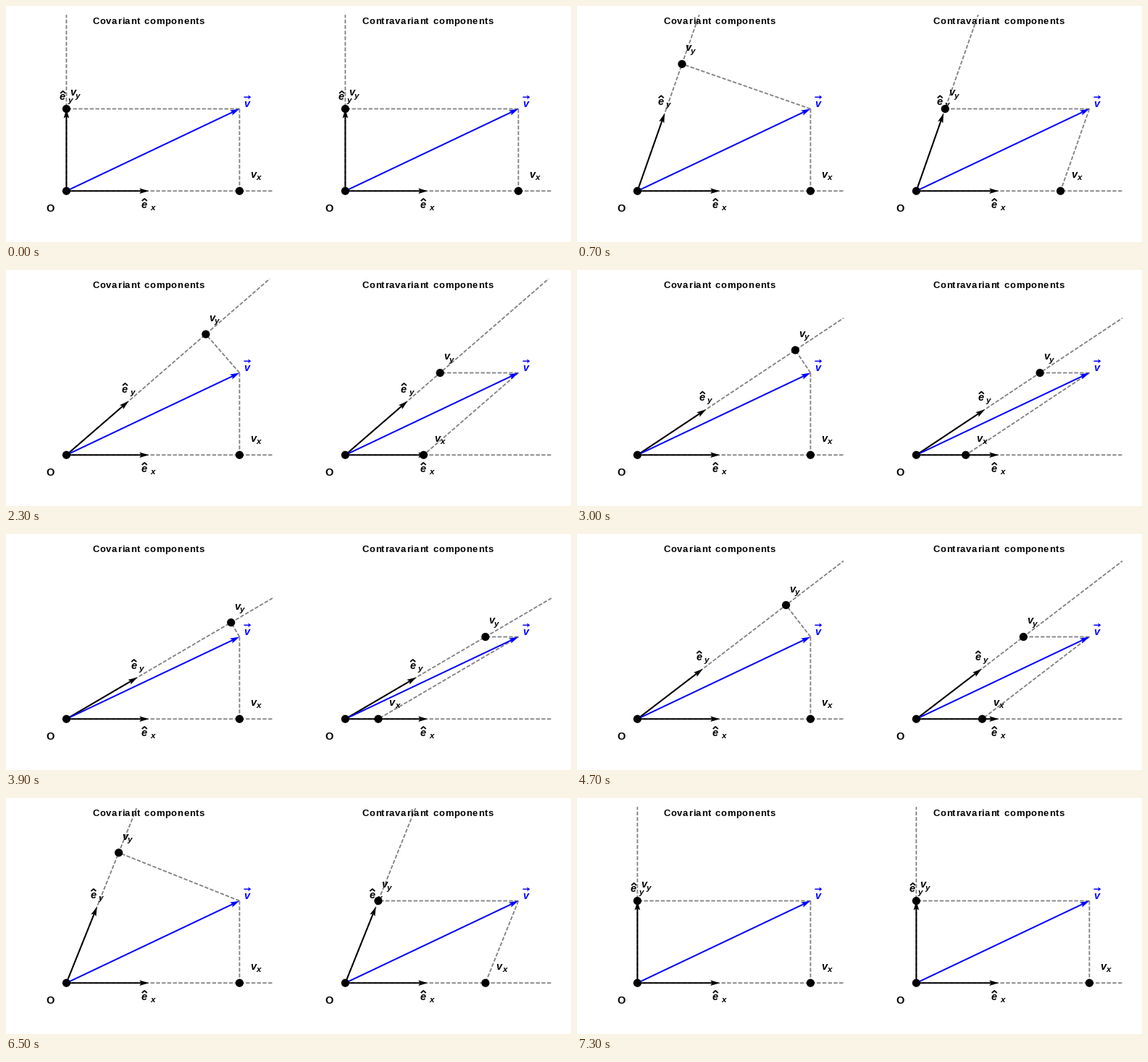
Animation of 780 by 327 pixels, one loop 7.4 s. Source, as a matplotlib script:

```python
import numpy as np
import matplotlib.pyplot as plt
from matplotlib.animation import FuncAnimation
from matplotlib.patches import Circle, Polygon
from matplotlib.textpath import TextPath

W, H, DPI = 780, 327, 100
PX = 72 / DPI                      # points per pixel
FRAMES, STEP = 74, 0.05
UNIT = 113.8                       # pixels per unit length
ORIGIN_Y, X_MAX, Y_MAX = 256.3, 2.5, 2.145
V = np.array([2.1, 1.0])
E_X = np.array([1.0, 0.0])
BLUE, GRAY = (0, 0, 1), (0.5, 0.5, 0.5)
FONT = "Liberation Sans"

plt.rcParams["path.snap"] = False
fig = plt.figure(figsize=(W / DPI, H / DPI), dpi=DPI, facecolor="white")
ax = fig.add_axes([0, 0, 1, 1])
ax.set_xlim(0, W)
ax.set_ylim(H, 0)
ax.axis("off")


def write(x, y, s, size, color="black", style="normal", ha="center"):
    return ax.text(x, y, s, fontsize=size * PX, color=color, family=FONT,
                   weight="bold", style=style, ha=ha, va="baseline", zorder=6)


def write_tracked(x, y, s, size=13, tracking=0.68):
    prop = {"family": FONT, "weight": "bold"}

    def width(t):
        return TextPath((0, 0), t, size=size, prop=prop).get_extents().width

    bars = width("||")
    for c in s:
        if c != " ":
            write(x, y, c, size, ha="left")
        x += width(f"|{c}|") - bars + tracking * (1 if c != " " else 2)


def stroke(color="black", width=2.0, dashed=False, zorder=3):
    line, = ax.plot([], [], color=color, lw=width * PX, zorder=zorder,
                    solid_capstyle="butt", dash_capstyle="butt")
    if dashed:
        line.set_linestyle((0, (3.0, 1.3)))
    return line


class Arrow:
    LENGTH, HALF, NOTCH = 13, 3.8, 10.5

    def __init__(self, color, zorder):
        self.line = stroke(color, 2, zorder=zorder)
        self.head = ax.add_patch(Polygon(np.zeros((4, 2)), color=color,
                                         lw=0, zorder=zorder))

    def set(self, a, b):
        u = (b - a) / np.hypot(*(b - a))
        n = np.array([-u[1], u[0]])
        back, notch = b - self.LENGTH * u, b - self.NOTCH * u
        self.head.set_xy([b, back + self.HALF * n, notch, back - self.HALF * n])
        self.line.set_data(*zip(a, notch))


class Label:
    """Italic letter with a subscript and an optional hat, tied to a point."""

    def __init__(self, letter, sub, offset, sub_offset, hat=False):
        self.parts = [(write(0, 0, letter, 14.5, style="italic"), offset),
                      (write(0, 0, sub, 11.5, style="italic"), sub_offset)]
        self.hat = stroke(width=1.8, zorder=6) if hat else None

    def set(self, p):
        for text, d in self.parts:
            text.set_position(p + np.array(d))
        if self.hat:
            x, y = p + np.array(self.parts[0][1])
            self.hat.set_data([x - 3, x + 0.5, x + 4], [y - 9.5, y - 12.6, y - 9.5])


class Panel:
    def __init__(self, x0, title, title_x, covariant):
        self.x0, self.covariant = x0, covariant
        write_tracked(title_x, 25, title)
        write(x0 - 22.5, 285, "O", 14.5)

        self.axis_y = stroke(GRAY, 1.8, True, 1)
        self.drop_x = stroke(GRAY, 1.8, True, 1)
        self.drop_y = stroke(GRAY, 1.8, True, 1)
        self.join(stroke(GRAY, 1.8, True, 1), (0, 0), (X_MAX, 0))

        origin, tip = self.at((0, 0)), self.at(V)
        Arrow(BLUE, 4).set(origin, tip)
        Arrow("black", 3).set(origin, self.at(E_X))
        self.e_y = Arrow("black", 3)
        self.dots = [ax.add_patch(Circle(origin, 5.6, color="black", lw=0, zorder=5))
                     for _ in range(3)]

        Label("e", "x", (-6.5, 23.3), (5, 26.3), True).set(self.at(E_X))
        self.label_e = Label("e", "y", (-5.3, -12), (5, -9), True)
        self.label_x = Label("v", "x", (18.5, -18), (26.5, -15))
        self.label_y = Label("v", "y", (8.7, -18), (15.2, -14.8))
        self.vector_label(tip)

    def at(self, p):
        return np.array([self.x0 + UNIT * p[0], ORIGIN_Y - UNIT * p[1]])

    def join(self, line, a, b):
        line.set_data(*zip(self.at(a), self.at(b)))

    def vector_label(self, tip):
        x, y = tip + np.array([10, -3])
        write(x, y, "v", 14.5, BLUE, "italic")
        y -= 13.2
        stroke(BLUE, 1.5, zorder=6).set_data([x - 4, x + 3], [y, y])
        ax.add_patch(Polygon([(x + 6, y), (x + 1.8, y - 3), (x + 2.8, y),
                              (x + 1.8, y + 3)], color=BLUE, lw=0, zorder=6))

    def set(self, slant):
        d = np.array([slant, 1.0])
        e_y = d / np.hypot(*d)
        if self.covariant:
            v_x, v_y = V[0] * E_X, (V @ e_y) * e_y
        else:
            v_y = V[1] * d
            v_x = V - v_y
        reach = min(Y_MAX, X_MAX / slant) if slant else Y_MAX
        self.join(self.axis_y, (0, 0), reach * d)
        self.join(self.drop_x, V, v_x)
        self.join(self.drop_y, V, v_y)
        self.e_y.set(self.at((0, 0)), self.at(e_y))
        self.dots[1].center = self.at(v_x)
        self.dots[2].center = self.at(v_y)
        self.label_e.set(self.at(e_y))
        self.label_x.set(self.at(v_x))
        self.label_y.set(self.at(v_y))


panels = [Panel(83.4, "Covariant components", 119.5, True),
          Panel(468.4, "Contravariant components", 491, False)]


def update(i):
    slant = STEP * min(i, FRAMES - 1 - i)
    for panel in panels:
        panel.set(slant)
    return []


anim = FuncAnimation(fig, update, frames=FRAMES, init_func=lambda: update(0),
                     interval=100, repeat=True, repeat_delay=0)
plt.show()
```
